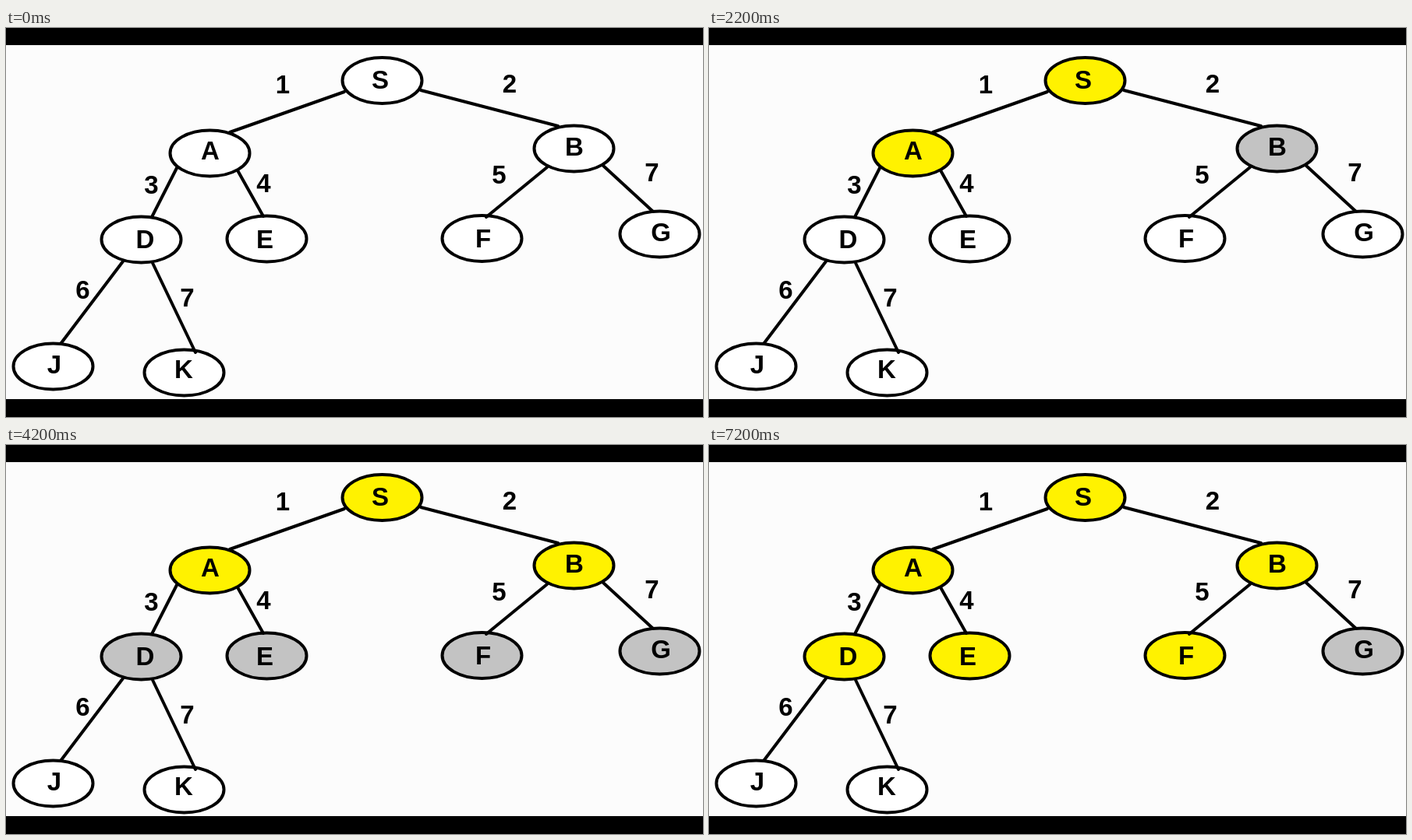
Animation, 894 px wide and 500 px high, one loop 8000 ms. Source, as an HTML page with a canvas:

```html
<!DOCTYPE html>
<html lang="en">
<head>
<meta charset="utf-8">
<title>Tree search</title>
<style>
html, body { margin: 0; width: 100%; height: 100%; overflow: hidden; background: #000; }
canvas { display: block; }
</style>
</head>
<body>
<canvas id="stage" width="894" height="500"></canvas>
<script>
const ctx = document.getElementById("stage").getContext("2d");
const LOOP = 8000, FADE = 100;
const WHITE = [255, 255, 255], GRAY = [195, 195, 195], YELLOW = [255, 242, 0];

// name, centre x/y, label x/baseline, time queued (gray), time visited (yellow)
const nodes = [
  ["S", 482.5, 67.5, 480, 78, null, 1100],
  ["A", 261.5, 161, 262, 169, 1100, 2100],
  ["B", 728.5, 155, 729, 164, 1100, 3100],
  ["D", 173.5, 272, 178.5, 283, 4100, 5100],
  ["E", 334.5, 271, 332, 283, 4100, 6100],
  ["F", 610.5, 270.5, 612, 282, 4100, 7100],
  ["G", 838.5, 265, 840, 274, 4100, null],
  ["J", 60.5, 435, 62, 444, null, null],
  ["K", 228.5, 443, 228, 450, null, null]
];

// x1, y1, x2, y2, cost, cost x/baseline
const edges = [
  [434, 82, 287, 134, "1", 355, 84],
  [532, 80, 708, 126, "2", 646, 83],
  [219, 180, 187, 243, "3", 186.5, 213],
  [297, 183, 330, 242, "4", 330.5, 211],
  [694, 179, 616, 243, "5", 632.5, 200],
  [766, 177, 830, 236, "7", 828.5, 197],
  [150, 300, 70, 406, "6", 98.5, 348],
  [188, 302, 243, 417, "7", 232.5, 358]
];

const mix = (a, b, k) => a.map((v, i) => v + (b[i] - v) * k);

// Each change shows one halfway blend before settling.
function progress(t, start) {
  if (start === null || t < start) return 0;
  return t < start + FADE ? 0.5 : 1;
}

function fillAt(t, queued, visited) {
  const base = mix(WHITE, GRAY, progress(t, queued));
  const c = mix(base, YELLOW, progress(t, visited));
  return `rgb(${c.map(Math.round).join(",")})`;
}

function label(text, x, y) {
  ctx.fillStyle = "#000";
  ctx.fillText(text, x, y);
}

function draw(t) {
  ctx.fillStyle = "#000";
  ctx.fillRect(0, 0, 894, 500);
  ctx.fillStyle = "#fcfcfc";
  ctx.fillRect(0, 22, 894, 455);

  ctx.font = 'bold 33px "Liberation Sans", Arial, sans-serif';
  ctx.textAlign = "center";
  ctx.strokeStyle = "#000";
  ctx.lineWidth = 4;
  ctx.lineCap = "round";

  for (const [name, x, y, lx, ly, queued, visited] of nodes) {
    ctx.beginPath();
    ctx.ellipse(x, y, 51, 29.5, 0, 0, Math.PI * 2);
    ctx.fillStyle = fillAt(t, queued, visited);
    ctx.fill();
    ctx.stroke();
    label(name, lx, ly);
  }

  for (const [x1, y1, x2, y2, cost, lx, ly] of edges) {
    ctx.beginPath();
    ctx.moveTo(x1, y1);
    ctx.lineTo(x2, y2);
    ctx.stroke();
    label(cost, lx, ly);
  }
}

const begin = performance.now();
function tick() {
  draw((performance.now() - begin) % LOOP);
  requestAnimationFrame(tick);
}
tick();
</script>
</body>
</html>
```
